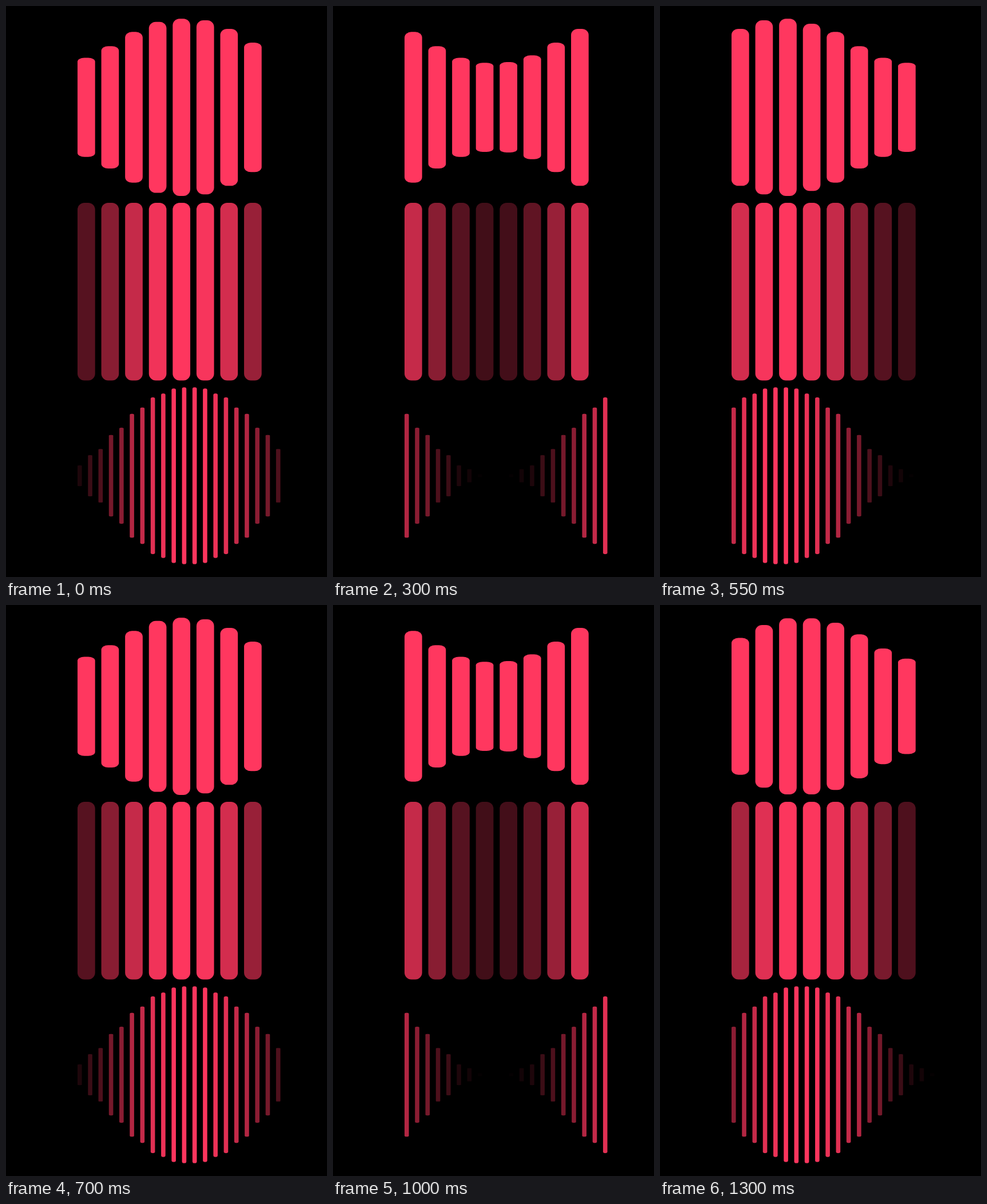
These frames come from a looping animation (561x998 px, 1.35 s). An HTML page with a canvas:

```html
<!DOCTYPE html>
<html lang="en">
<head>
<meta charset="utf-8">
<title>Bar waves</title>
<style>
  html, body { margin: 0; width: 100%; height: 100%; overflow: hidden; background: #000; }
  canvas { display: block; width: 561px; height: 998px; }
</style>
</head>
<body>
<canvas id="stage" width="561" height="998"></canvas>
<script>
const ctx = document.getElementById('stage').getContext('2d');

const LOOP = 1350;        // ms
const STEP = 50;          // ms per picture
const HALF = 21;          // ticks (1/60 s) for one swing
const LEAD = 16;          // ticks until the first bar peaks, counted backwards
const SPREAD = 30;        // ticks of delay shared across a row
const LEFT = 125, HEIGHT = 310.4;

const rows = [
  { count: 8,  y: 177.1, width: 30.7, pitch: 41.58, radius: 12,  minScale: 0.5, minAlpha: 1 },
  { count: 8,  y: 499.2, width: 30.7, pitch: 41.58, radius: 12,  minScale: 1,   minAlpha: 0.25 },
  { count: 20, y: 821,   width: 7.6,  pitch: 18.26, radius: 3.1, minScale: 0,   minAlpha: 0 }
];

const mix = (a, b, u) => a + (b - a) * u;

// cubic-bezier(.42, 0, .58, 1), solved by bisection
function easeInOut(x) {
  let lo = 0, hi = 1, s = 0.5;
  for (let i = 0; i < 24; i++) {
    s = (lo + hi) / 2;
    const r = 1 - s;
    if (1.26 * s * r * r + 1.74 * s * s * r + s * s * s < x) lo = s; else hi = s;
  }
  return s * s * (3 - 2 * s);
}

function level(tick, index, count) {
  const delay = Math.ceil(SPREAD * index / count);
  const phase = (tick + LEAD - delay + 4 * HALF) % (2 * HALF);
  return easeInOut(1 - Math.min(phase, 2 * HALF - phase) / HALF);
}

function drawBar(row, index, u) {
  const scale = mix(row.minScale, 1, u);
  ctx.save();
  ctx.globalAlpha = mix(row.minAlpha, 1, u);
  ctx.translate(LEFT + index * row.pitch, row.y);
  ctx.scale(1, scale);
  ctx.beginPath();
  ctx.roundRect(0, -HEIGHT / 2, row.width, HEIGHT, row.radius);
  ctx.fill();
  ctx.restore();
}

function draw(time) {
  const tick = Math.floor((time % LOOP) / STEP) * 3;
  ctx.fillStyle = '#000';
  ctx.fillRect(0, 0, 561, 998);
  ctx.fillStyle = '#ff375f';
  for (const row of rows)
    for (let i = 0; i < row.count; i++) drawBar(row, i, level(tick, i, row.count));
}

const start = performance.now();
function frame() {
  draw(performance.now() - start);
  requestAnimationFrame(frame);
}
frame();
</script>
</body>
</html>
```
